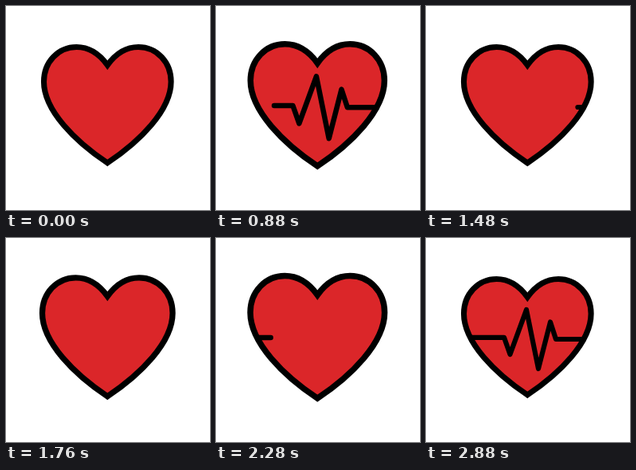
These frames come from a looping animation (256 by 256 pixels, 6 s). An HTML page:

```html
<!DOCTYPE html>
<html lang="en">
<head>
<meta charset="utf-8">
<title>Heartbeat</title>
<style>
  html, body { margin: 0; width: 100%; height: 100%; overflow: hidden; background: #fff; }
  svg { display: block; width: 100%; height: 100%; }
</style>
</head>
<body>
<svg viewBox="0 0 256 256">
  <g id="beat" stroke="#000">
    <path fill="#db2629" stroke-width="7.1" stroke-linejoin="miter"
      d="M127.3 74.2C117.5 60.5 104.5 51.5 88.5 51.5C65.5 51.5 47.5 70.3 47.5 95C47.5 131 87.3 170.4 127.3 196.9C167.3 170.4 207.1 131 207.1 95C207.1 70.3 189.1 51.5 166.1 51.5C150.1 51.5 137.1 60.5 127.3 74.2Z"/>
    <path id="pulse" fill="none" stroke-width="6.2" stroke-linecap="round" stroke-linejoin="round"
      pathLength="1" d="M56 124.8H98L105.5 146L126 90L141 164L156 105.5L163 127H198"/>
  </g>
</svg>
<script>
  const LOOP = 6000, STEP = 40, ACTIVE = 2880, BEAT = 1440;
  const beat = document.getElementById('beat');
  const pulse = document.getElementById('pulse');

  // Sine ease from 0 to 1 between two times
  const ease = (t, from, to) => {
    const p = Math.min(1, Math.max(0, (t - from) / (to - from)));
    return (1 - Math.cos(Math.PI * p)) / 2;
  };

  function trim(start, end) {
    const len = end - start;
    pulse.style.visibility = len > 0.0005 ? 'visible' : 'hidden';
    pulse.setAttribute('stroke-dasharray', `${len} 2`);
    pulse.setAttribute('stroke-dashoffset', -start);
  }

  function draw(ms) {
    const t = Math.min(ACTIVE, Math.floor((ms % LOOP) / STEP) * STEP);
    const scale = 1 + 0.03 * (1 - Math.cos(2 * Math.PI * t / BEAT));
    beat.setAttribute('transform', `translate(127.3 121) scale(${scale}) translate(-127.3 -121)`);
    if (t < 1600) trim(ease(t, 750, 1560), ease(t, 0, 720));
    else trim(0, ease(t, 2180, ACTIVE));
  }

  const origin = performance.now();
  function tick(now) {
    draw(Math.max(0, now - origin));
    requestAnimationFrame(tick);
  }
  draw(0);
  requestAnimationFrame(tick);
</script>
</body>
</html>
```
